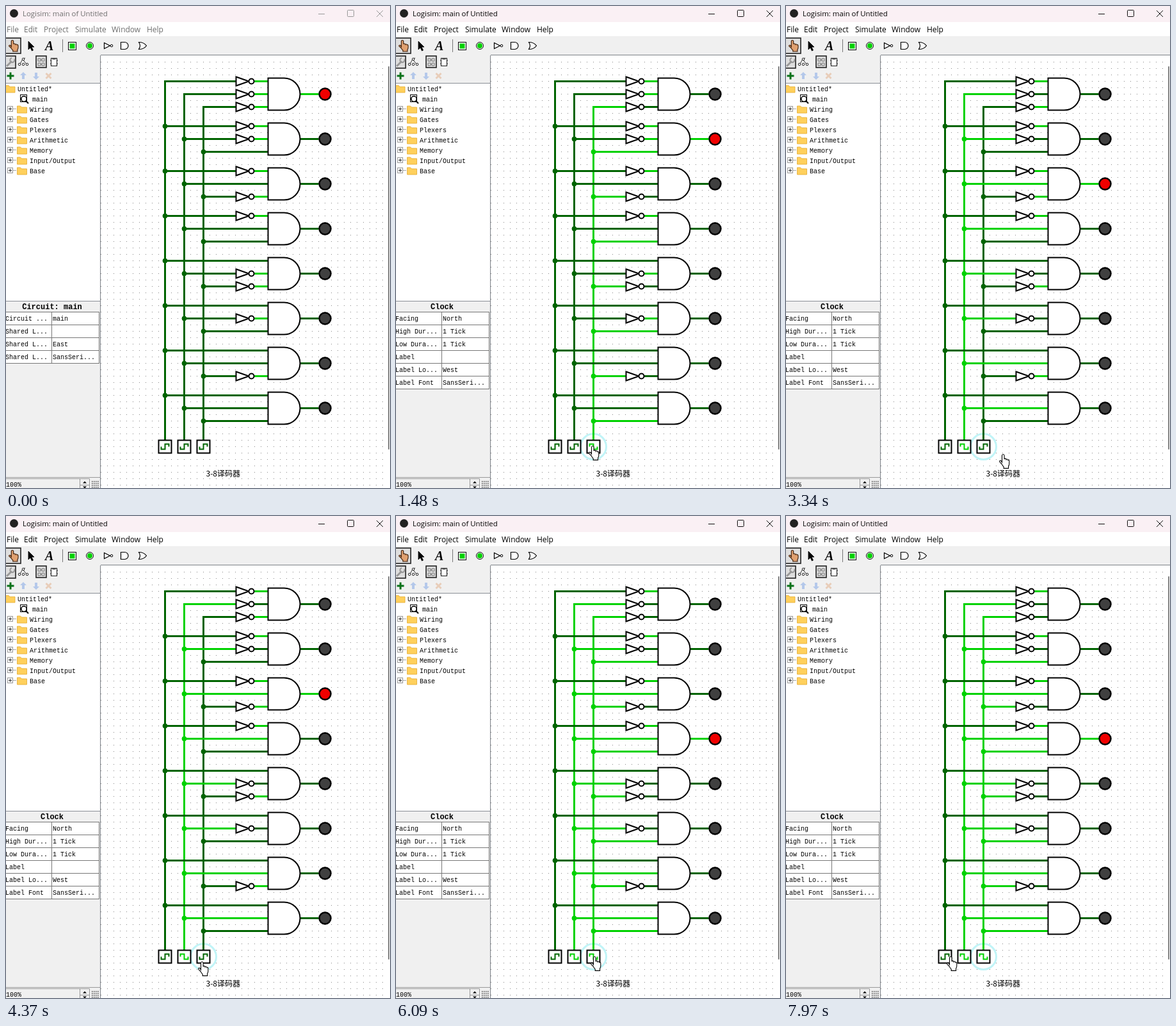
Recreate the animation shown at these times as an HTML page. Size 600x752 px, loop 8000 ms.

```html
<!DOCTYPE html>
<html lang="en">
<head>
<meta charset="utf-8">
<title>3-8 decoder</title>
<style>
html, body { margin: 0; width: 100%; height: 100%; overflow: hidden; background: #fff; }
svg { display: block; }
text { white-space: pre; }
.ui { font: 12px "Open Sans", "Noto Sans", sans-serif; }
.mono { font: 10px "Liberation Mono", "DejaVu Sans Mono", monospace; }
.head { font: bold 12px "Liberation Mono", monospace; text-anchor: middle; }
.label { font: 12px "Noto Sans CJK SC", "Noto Sans CJK", "Noto Sans CJK JP", sans-serif; }
.off { stroke: #006400; fill: #006400; }
.on { stroke: #00d200; fill: #00d200; }
.line { fill: none; }
</style>
</head>
<body>
<svg id="stage" width="600" height="752" viewBox="0 0 600 752"></svg>
<script>
const LOOP = 8000;
const BUS_X = [248, 278, 308];
const stage = document.getElementById('stage');

const rect = (x, y, w, h, fill, extra = '') =>
  `<rect x="${x}" y="${y}" width="${w}" height="${h}" fill="${fill}" ${extra}/>`;
const path = (d, stroke = '#000', width = 1, fill = 'none', extra = '') =>
  `<path d="${d}" stroke="${stroke}" stroke-width="${width}" fill="${fill}" ${extra}/>`;
const circle = (x, y, r, fill, extra = '') =>
  `<circle cx="${x}" cy="${y}" r="${r}" fill="${fill}" ${extra}/>`;
const text = (x, y, s, cls, extra = '') => `<text x="${x}" y="${y}" class="${cls}" ${extra}>${s}</text>`;
const wire = (net, d) => `<path data-net="${net}" class="off" d="${d}" stroke-width="3"/>`;
const HAND = 'M4.5 13V2.5q0-2 1.8-2t1.8 2V8q.3-1 1.5-.9 1.5.1 1.6 1.5.4-.8 1.4-.6 1.2.2 1.3 1.5.4-.5 1.1-.2.8.4.8 1.6v4q0 2.3-1.2 4v3.5H7.2v-2.2Q5.5 18 4 15.5L1 12.3q-.8-1.2.1-1.9 1-.7 2.1.4z';

function titleBar() {
  const menu = [[1, 'File'], [28, 'Edit'], [59, 'Project'], [108, 'Simulate'], [165, 'Window'], [220, 'Help']];
  return rect(0, 0, 600, 25, '#faf0f4') + circle(12.5, 11.5, 6.5, '#222') +
    `<g id="chrome">` + text(26, 16, 'Logisim: main of Untitled', 'ui', 'style="font-size:11.4px"') +
    menu.map(([x, s]) => text(x, 41, s, 'ui')).join('') + `</g>` +
    `<path id="buttons" fill="none" d="M488 12.5h10M534.500 6.500h8q1 0 1 1v8q0 1-1 1h-8q-1 0-1-1v-8q0-1 1-1zM579 7l10 10m0-10l-10 10"/>`;
}

function toolBar() {
  const selected = (x, y, w, h) => rect(x, y, w, h, '#dedede', 'stroke="#222" stroke-width="1.6"');
  return rect(0, 47, 600, 30, '#f0f0f0') + rect(0, 77, 147, 44, '#f0f0f0') +
    selected(-2, 50, 25, 24) +
    `<g transform="translate(4 53) scale(.95 .8)">${path(HAND, '#3a1c08', 1.2, '#e0a070')}</g>` +
    path('M35 55v13l3-3 2.500 5 2-1-2.500-5h4z', '#000', .8, '#000') +
    text(61, 69, 'A', '', 'font-family="Liberation Serif, serif" font-size="20" font-weight="bold" font-style="italic"') +
    path('M88.500 52v20', '#777') +
    rect(97.5, 56.5, 12, 12, '#fff', 'stroke="#000"') + rect(99.5, 58.5, 8, 8, '#00d200') +
    circle(131, 62, 5.5, '#fff', 'stroke="#000"') + circle(131, 62, 4, '#00d200') +
    path('M153.500 57.500v9l9-4.500z', '#000', 1.2, '#fff') + circle(165, 62, 1.8, '#fff', 'stroke="#000"') +
    path('M179.500 56.500h6a5.500 5.500 0 0 1 0 11h-6z', '#000', 1.2, '#fff') +
    path('M207.500 56.500q8 0 12 5.500q-4 5.500-12 5.500q4-5.500 0-11z', '#000', 1.2, '#fff') +
    selected(-2, 78, 17, 19) + path('M1 94l8-8', '#999', 3) +
    path('M13 83a3.500 3.500 0 1 1-4-2', '#999', 2) +
    path('M21 92l5-9 7 9M26 83l4-2', '#333') +
    [[21, 91], [27, 83], [27, 91], [33, 91]].map(([x, y]) => circle(x, y, 1.8, '#fff', 'stroke="#222"')).join('') +
    selected(47, 78, 16, 18) +
    path('M50 82h4v4h-4zM56 82h4v4h-4zM50 89h4v4h-4zM56 89h4v4h-4zM54 84h2m-2 7h2', '#777') +
    path('M70.500 81.500h9v12h-9zM73 81v2h4v-2M69 85h2m-2 5h2m8-5h2m-2 5h2', '#222', 1.1, '#fff') +
    path('M7 103.500v11M1.500 109h11', '#087018', 3) +
    path('M27 103l5 5h-3v6h-4v-6h-3z', 'none', 0, '#b4c8ea') +
    path('M47 115l5-5h-3v-6h-4v6h-3z', 'none', 0, '#b4c8ea') +
    path('M62.500 105l8 8m0-8l-8 8', '#e8cdb9', 3);
}

function explorer() {
  const folder = (x, y) => path(`M${x} ${y - 5}h5l2 2h8v9h-15z`, '#e4a92c', .8, '#ffd05c');
  const libs = ['Wiring', 'Gates', 'Plexers', 'Arithmetic', 'Memory', 'Input/Output', 'Base'];
  return rect(0, 121, 147, 339, '#fff') + path('M0 120.500h147', '#8a8f96') +
    folder(-1, 129) + text(18, 133, 'Untitled*', 'mono') +
    rect(22.5, 138.5, 10, 11, '#fff', 'stroke="#000"') +
    circle(28, 145, 4.2, '#fff', 'stroke="#000" stroke-width="1.6"') + path('M31 148l4 4', '#000', 2) +
    text(41, 149, 'main', 'mono') +
    libs.map((name, i) => {
      const y = 161 + 16 * i;
      return rect(2.5, y - 4.5, 8, 8, '#fff', 'stroke="#999"') +
        path(`M4 ${y - .5}h5M6.500 ${y - 3}v5`, '#333') + path(`M11 ${y - .5}h5`, '#aaa') +
        folder(17.5, y) + text(37, y + 4, name, 'mono');
    }).join('');
}

function attributes(id, title, rows) {
  const bottom = 477.5 + 20 * rows.length;
  return `<g id="${id}">` + text(72, 473, title, 'head') + rect(0, 478, 146, bottom - 478, '#fff') +
    path(`M71.500 477.500V${bottom}M145.500 477.500V${bottom}`, '#777') +
    path('M0 477.500h146', '#777') +
    rows.map(([key, value], i) =>
      path(`M0 ${497.5 + 20 * i}h146`, '#777') +
      text(-1, 491 + 20 * i, key, 'mono') + text(73, 491 + 20 * i, value, 'mono')).join('') + `</g>`;
}

function sidePanel() {
  let grip = '';
  for (let i = 0; i < 16; i++) grip += rect(134 + i % 4 * 3, 741 + (i >> 2) * 3, 1.5, 1.5, '#444');
  return rect(0, 460, 147, 292, '#f0f0f0') + path('M0 460.500h147', '#8a8f96') +
    attributes('circuitAttrs', 'Circuit: main',
      [['Circuit ...', 'main'], ['Shared L...', ''], ['Shared L...', 'East'], ['Shared L...', 'SansSeri...']]) +
    attributes('clockAttrs', 'Clock',
      [['Facing', 'North'], ['High Dur...', '1 Tick'], ['Low Dura...', '1 Tick'], ['Label', ''],
       ['Label Lo...', 'West'], ['Label Font', 'SansSeri...']]) +
    path('M0 735.500h147', '#999') + rect(0, 737, 131, 15, '#f0f0f0') + text(0, 750, '100%', 'mono') +
    path('M0 737.500h130.500V752M115.500 738v14M115 747.500h15', '#999') +
    path('M120 744.500l3-3 3 3zM120 749.500l3 3 3-3z', 'none', 0, '#000') + grip +
    path('M147.500 77V752', '#7d8288');
}

function gate(i) {
  const y = 137 + 70 * i;
  let out = '';
  BUS_X.forEach((x, b) => {
    const wy = y + 20 * (b - 1), direct = i >> (2 - b) & 1;
    out += wire(b, `M${x} ${wy}H${direct ? 409 : 359}`);
    if (i) out += `<circle data-net="${b}" class="off" cx="${x}" cy="${wy}" r="3.5" stroke-width="1"/>`;
    if (!direct) out += wire('n' + b, `M387 ${wy}H409`) +
      path(`M359 ${wy - 7}v14l20-7z`, '#000', 2, '#fff') + circle(383, wy, 4, '#fff', 'stroke="#000" stroke-width="2"');
  });
  return out + wire('g' + i, `M459 ${y}H488`) +
    path(`M409 ${y - 25}h25a25 25 0 0 1 0 50h-25z`, '#000', 2, '#fff') +
    `<circle data-lamp="${i}" cx="498" cy="${y}" r="9" stroke="#000" stroke-width="2.5"/>`;
}

function circuit() {
  let out = `<defs><pattern id="grid" x="8" y="7" width="10" height="10" patternUnits="userSpaceOnUse">` +
    rect(0, 0, 1, 1, '#858585') + `</pattern></defs>` +
    rect(148, 77, 452, 675, '#fff') + rect(148, 78, 443, 674, 'url(#grid)') +
    path('M148 76.500H600', '#7d8288') + path('M598 95V691', '#858585', 2, 'none', 'stroke-linecap="round"') +
    `<g transform="translate(.5 .5)">` +
    `<circle id="halo" cy="687" r="20" fill="none" stroke="#c0f4f7" stroke-width="3"/>`;
  BUS_X.forEach((x, b) => { out += wire(b, `M${x} ${115.5 + 20 * b}V677`); });
  for (let i = 0; i < 8; i++) out += gate(i);
  BUS_X.forEach((x, b) => {
    out += rect(x - 10, 677, 20, 20, '#fff', 'stroke="#000" stroke-width="2"') +
      `<path data-clock="${b}" stroke-width="2" style="fill:none"/>`;
  });
  return out + `</g>` + text(312.5, 734, '3-8译码器', 'label');
}

stage.innerHTML = rect(0, 0, 600, 752, '#fff') + titleBar() + toolBar() + circuit() + explorer() + sidePanel() +
  `<g id="cursor">${path(HAND, '#000', 1.1, '#fff')}</g>`;

const el = id => document.getElementById(id);
const all = key => [...stage.querySelectorAll(`[data-${key}]`)];
const nets = all('net'), lamps = all('lamp'), clocks = all('clock');

// Each move: first step, last step, number of steps, destination x, y.
const MOVES = [
  [230, 780, 8, 302, 680], [1100, 1320, 4, 304, 684], [1480, 1950, 7, 286, 696],
  [2170, 2400, 4, 275, 686], [2710, 2950, 4, 300, 692], [3110, 3340, 4, 333, 699],
  [3420, 3500, 2, 346, 700], [3890, 4050, 3, 299, 695], [4290, 4520, 4, 301, 694],
  [4600, 4760, 3, 304, 690], [4990, 5070, 2, 310, 690], [5230, 5230, 1, 310, 689],
  [5310, 5390, 2, 304, 690], [5620, 5700, 2, 299, 690], [5850, 5940, 2, 304, 687],
  [6410, 6490, 2, 305, 687], [6650, 7270, 9, 244, 687], [7740, 7740, 1, 252, 688],
  [7820, 7820, 1, 260, 689], [7970, 7970, 1, 251, 687]
];

function cursorAt(t) {
  let x = 393, y = 727;
  for (const [start, end, steps, toX, toY] of MOVES) {
    if (t < start) break;
    const gap = (end - start) / (steps - 1 || 1) || 1;
    const done = Math.min(steps, Math.floor((t - start) / gap + 1e-6) + 1) / steps;
    x += (toX - x) * done;
    y += (toY - y) * done;
  }
  return [Math.round(x), Math.round(y)];
}

const show = (id, visible) => el(id).setAttribute('visibility', visible ? 'visible' : 'hidden');

function render(t) {
  const bits = [false, t >= 2560, (t >= 1250 && t < 3110) || t >= 6090];
  const value = bits.reduce((sum, bit) => sum * 2 + bit, 0);
  const live = net => net[0] === 'g' ? +net[1] === value : net[0] === 'n' ? !bits[net[1]] : bits[net];

  nets.forEach(n => n.setAttribute('class', live(n.dataset.net) ? 'on' : 'off'));
  lamps.forEach((lamp, i) => lamp.setAttribute('fill', i === value ? '#f00000' : '#404040'));
  clocks.forEach((clock, b) => {
    const s = bits[b] ? -1 : 1;
    clock.setAttribute('class', bits[b] ? 'on' : 'off');
    clock.setAttribute('d', `M${BUS_X[b] - 6} 687v${4 * s}h6v${-8 * s}h6v${4 * s}`);
  });

  const focused = t >= 1100, picked = t >= 1180;
  el('chrome').setAttribute('fill', focused ? '#000' : '#6e6e6e');
  el('buttons').setAttribute('stroke', focused ? '#111' : '#999');
  show('circuitAttrs', !picked);
  show('clockAttrs', picked);
  show('halo', picked);
  el('halo').setAttribute('cx', t >= 2480 && t < 2950 ? 278 : 308);

  const [x, y] = cursorAt(t);
  show('cursor', t >= 230);
  el('cursor').setAttribute('transform', `translate(${x} ${y})`);
}

const begin = performance.now();
function tick() {
  render((performance.now() - begin) % LOOP);
  requestAnimationFrame(tick);
}
tick();
</script>
</body>
</html>
```
